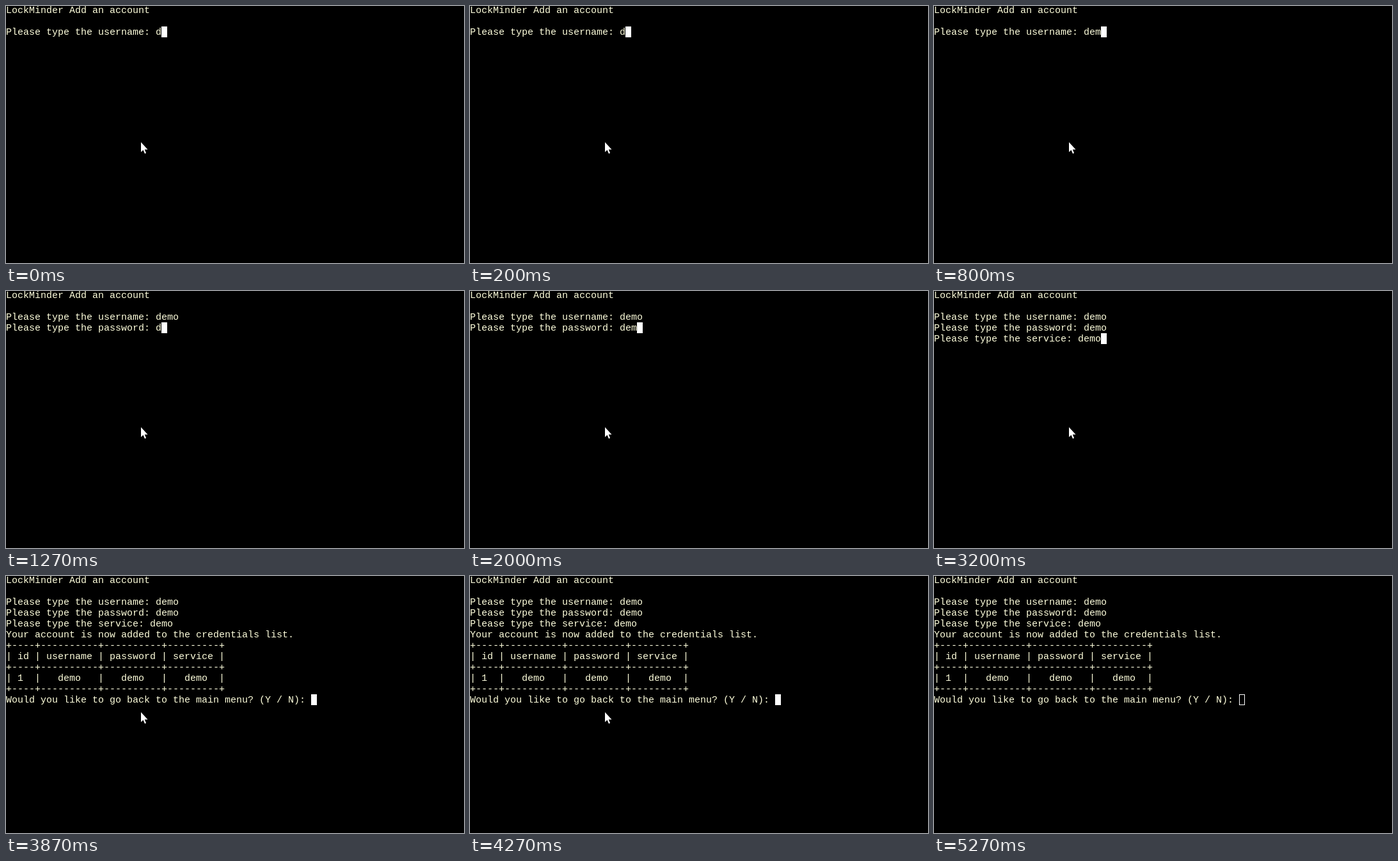
Animation of 716x402 px, one loop 5.31 s. Source, as an HTML page:

```html
<!DOCTYPE html>
<html lang="en">
<head>
<meta charset="utf-8">
<title>Add an account</title>
<style>
  html, body { margin: 0; width: 100%; height: 100%; overflow: hidden; background: #000; }
  svg { display: block; }
  text { font: 15px "Liberation Mono", "Courier New", monospace; fill: #ffffdc; white-space: pre; }
</style>
</head>
<body>
<svg width="716" height="402" viewBox="0 0 716 402">
  <rect width="716" height="402" fill="#000"/>
  <g id="screen"></g>
  <rect id="cursor"/>
  <path id="pointer" d="M211 213V228.5L214.5 225.2L217 231L219 230L216.8 224.4H221.5Z" fill="#fff"/>
</svg>
<script>
const LOOP = 5310, CELL = 9, ROW = 17, TOP = -2, BASELINE = 13;
const BLUR_AT = 5050;
const WORD = 'demo';

// Each time adds one more character of the word.
const prompts = [
  { label: 'Please type the username: ', shown: 0, keys: [0, 600, 740, 880] },
  { label: 'Please type the password: ', shown: 1140, keys: [1240, 1540, 1800, 2330] },
  { label: 'Please type the service: ', shown: 2560, keys: [2720, 2880, 3000, 3120] }
];
const RESULT_AT = 3460;

const rule = '+' + [4, 10, 10, 9].map(n => '-'.repeat(n)).join('+') + '+';
const result = [
  'Your account is now added to the credentials list.',
  rule,
  '| id | username | password | service |',
  rule,
  `| 1  |   ${WORD}   |   ${WORD}   |   ${WORD}  |`,
  rule,
  'Would you like to go back to the main menu? (Y / N): '
];

const byId = id => document.getElementById(id);
const setAttrs = (el, attrs) => {
  for (const key in attrs) el.setAttribute(key, attrs[key]);
};

const rows = Array.from({ length: 12 }, (_, i) => {
  const el = document.createElementNS('http://www.w3.org/2000/svg', 'text');
  setAttrs(el, { x: 0, y: TOP + i * ROW + BASELINE });
  byId('screen').append(el);
  return el;
});

function linesAt(t) {
  const lines = ['LockMinder Add an account', ''];
  for (const { label, shown, keys } of prompts) {
    if (t >= shown) lines.push(label + WORD.slice(0, keys.filter(k => t >= k).length));
  }
  return t >= RESULT_AT ? lines.concat(result) : lines;
}

function draw(t) {
  const lines = linesAt(t);
  rows.forEach((el, i) => {
    const line = lines[i] || '';
    if (el.textContent !== line) el.textContent = line;
  });

  const focused = t < BLUR_AT;
  const inset = focused ? 0 : 0.5;
  const last = lines.length - 1;
  setAttrs(byId('cursor'), {
    x: lines[last].length * CELL + inset,
    y: TOP + last * ROW + inset,
    width: CELL - 2 * inset,
    height: ROW - 2 * inset,
    fill: focused ? '#fff' : 'none',
    stroke: focused ? 'none' : '#fff'
  });
  byId('pointer').style.display = focused ? '' : 'none';
}

const start = performance.now();
function tick() {
  draw((performance.now() - start) % LOOP);
  requestAnimationFrame(tick);
}
tick();
</script>
</body>
</html>
```
